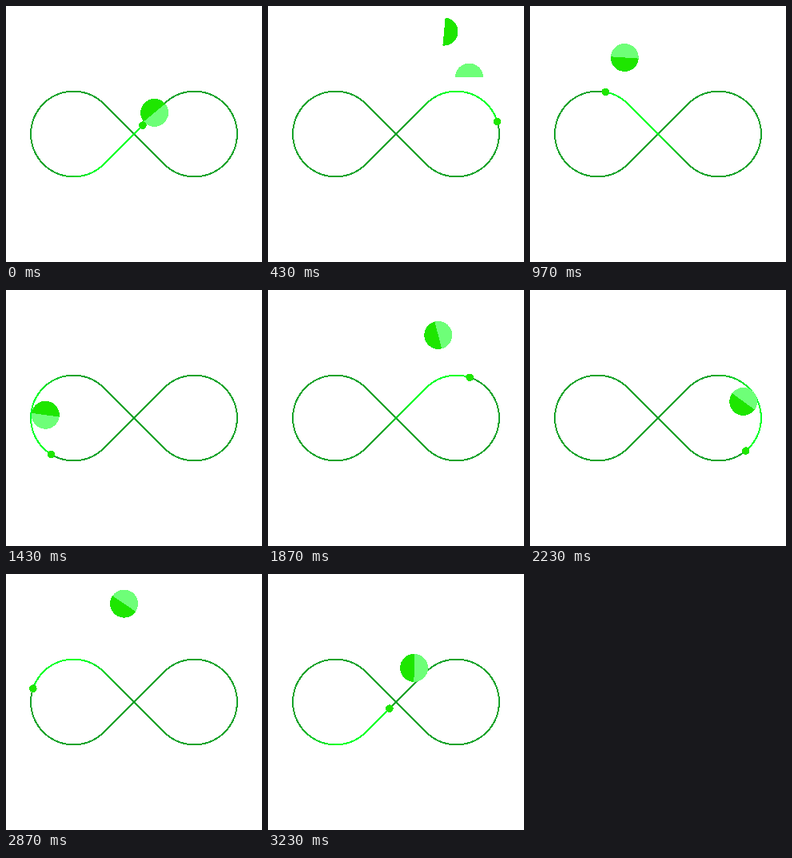
These frames come from a looping animation (320x320 px, 3.26 s). An HTML page:

```html
<!DOCTYPE html>
<html>
<head>
<meta charset="utf-8">
<style>
html, body { margin: 0; width: 100%; height: 100%; overflow: hidden; background: #fff; }
svg { display: block; width: 100vw; height: 100vh; }
</style>
</head>
<body>
<svg id="stage" viewBox="0 0 320 320" shape-rendering="crispEdges" fill="none" stroke-width="2"></svg>
<script>
const LOOP = 3260, LOBE = LOOP / 4;
const R = 53.4, HALF = R * (2 + 1.5 * Math.PI);
const DARK = '#1ee600', LIGHT = '#6eff78';
const TRAIL = 140, STEP = 5;

// Waypoints of the disc: time, x, y, angle of its dark half
const waypoints = [
  [0, 185.5, 133.5, -130],
  [430, 235.75, 60.5, 5],
  [660, 212, 175, 50],
  [970, 118.5, 64.5, 94],
  [1430, 49.5, 156, -82],
  [1520, 58, 190, -60],
  [1870, 212.5, 56.5, 165],
  [2240, 266, 140, 125],
  [2530, 151, 92, 90],
  [2950, 152, 35.5, 135],
  [3230, 182.5, 117, 180]
];
const cycle = [LOOP, 0, 0, 360];

function waypoint(i) {
  const n = waypoints.length, turn = Math.floor(i / n);
  return waypoints[i - turn * n].map((v, c) => v + turn * cycle[c]);
}

// Smooth curve through the waypoints, without a seam at the loop.
function discAt(t) {
  const i = waypoints.findLastIndex(w => w[0] <= t);
  const [a, b, c, d] = [-1, 0, 1, 2].map(n => waypoint(i + n));
  const span = c[0] - b[0], k = (t - b[0]) / span, j = 1 - k;
  return b.map((v, m) => {
    const out = (c[m] - a[m]) / (c[0] - a[0]) * span;
    const into = (d[m] - b[m]) / (d[0] - b[0]) * span;
    return j * j * (1 + 2 * k) * v + k * j * j * out
         + k * k * (3 - 2 * k) * c[m] - k * k * j * into;
  });
}

// Distance of the dot: fast at the crossing, slow around each lobe.
function dotAt(t) {
  const lobe = Math.floor(t / LOBE), k = t / LOBE - lobe;
  const eased = 1.32 * k - 1.79 * k ** 2 + 1.47 * k ** 3;
  return 14.85 + HALF * (lobe + eased);
}

function pathPoint(s) {
  const lobe = Math.floor(s / HALF), u = s - lobe * HALF;
  let x, y;
  if (u < R) {
    x = u * Math.SQRT1_2;
    y = -x;
  } else if (u > HALF - R) {
    x = y = (HALF - u) * Math.SQRT1_2;
  } else {
    const a = (u - R) / R - 0.75 * Math.PI;
    x = R * (Math.SQRT2 + Math.cos(a));
    y = R * Math.sin(a);
  }
  return [160 + (lobe % 2 ? -x : x), 160 + y];
}

function pathData(from, to) {
  const points = [];
  for (let s = from; s < to; s += 2) points.push(pathPoint(s));
  points.push(pathPoint(to));
  return 'M' + points.join('L');
}

function add(tag, attrs) {
  const el = document.createElementNS('http://www.w3.org/2000/svg', tag);
  return stage.appendChild(set(el, attrs));
}

function set(el, attrs) {
  for (const name in attrs) el.setAttribute(name, attrs[name]);
  return el;
}

function trailColor(d) {
  const k = Math.min(1, 2.5 * (1 - d / TRAIL));
  return `rgb(${23 - 23 * k}, ${163 + 92 * k}, ${43 - 3 * k})`;
}

const stage = document.getElementById('stage');
add('path', { d: pathData(0, 2 * HALF), stroke: trailColor(TRAIL) });
const trail = [];
for (let d = TRAIL; d > 0; d -= STEP) {
  trail.push({ d, el: add('path', { stroke: trailColor(d) }) });
}
const halfDisc = 'M0-17.5A17.5 17.5 0 0 1 0 17.5Z';
const light = add('path', { d: halfDisc, fill: LIGHT });
const dark = add('path', { d: halfDisc, fill: DARK });
const dot = add('circle', { r: 4.8, fill: DARK });

function place(el, x, y, angle) {
  set(el, { transform: `translate(${x} ${y}) rotate(${angle})` });
}

function draw(t) {
  const head = dotAt(t);
  for (const { d, el } of trail) {
    set(el, { d: pathData(head - d, head - d + STEP + 1) });
  }

  // The cut halves drift apart and meet again.
  const [, x, y, angle] = discAt(t);
  const split = t < 860 ? Math.sin(Math.PI * t / 860) ** 2 : 0;
  const dx = 15.75 * split, dy = 28.5 * split;
  place(dark, x - dx, y - dy, angle);
  place(light, x + dx, y + dy, angle + 180 + 85 * split);

  const [cx, cy] = pathPoint(head);
  set(dot, { cx, cy });
}

const start = performance.now();
function tick() {
  draw((performance.now() - start) % LOOP);
  requestAnimationFrame(tick);
}
tick();
</script>
</body>
</html>
```
